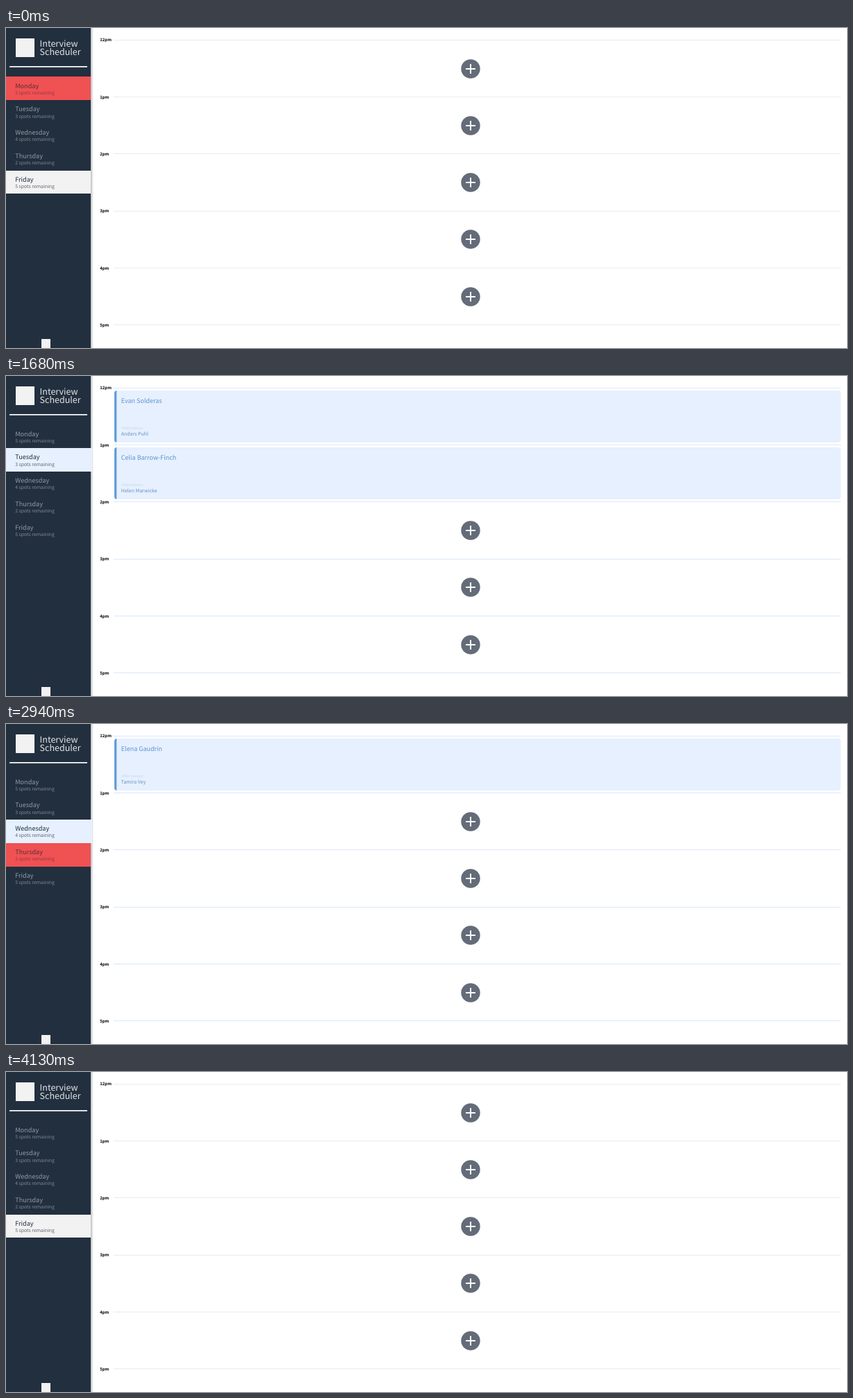
Recreate the animation shown at these times as an HTML page with a canvas. Size 1211 by 462 pixels, loop 5040 ms.

```html
<!DOCTYPE html>
<html lang="en">
<head>
<meta charset="utf-8">
<title>Interview Scheduler</title>
<style>
  html, body { margin: 0; width: 100%; height: 100%; overflow: hidden; background: #fff; }
  canvas { display: block; }
</style>
</head>
<body>
<canvas id="stage" width="1211" height="462"></canvas>
<script>
const ctx = document.getElementById('stage').getContext('2d');
const LOOP = 5040;
const FONT = '"Noto Sans CJK JP", "Noto Sans CJK SC", "Noto Sans CJK", "Noto Sans", sans-serif';
const NAVY = '#222f3e', RED = '#f05152';
const ROW_TOP = 70.2, ROW_H = 33.85, SLOT_TOP = 17.1, SLOT_H = 82.3;

// Each slot holds [student, interviewer] or null.
const DAYS = [
  { name: 'Monday', spots: 5, slots: [] },
  { name: 'Tuesday', spots: 3, slots: [['Evan Solderas', 'Anders Puhl'], ['Celia Barrow-Finch', 'Helen Marwicke']] },
  { name: 'Wednesday', spots: 4, slots: [['Elena Gaudrin', 'Tamira Vey']] },
  { name: 'Thursday', spots: 2, slots: [['qwzxtr', 'Harriet Solam'], ['Gabriel Lowe-Sandoza', 'Ivor Thul'], null, ['Bernard Tolk', 'Anders Puhl']] },
  { name: 'Friday', spots: 5, slots: [] }
];

// Start time, selected day, hovered day (-1 for none).
const STEPS = [
  [0, 4, 0], [70, 0, -1], [1120, 0, 1], [1680, 1, -1], [2170, 1, 2],
  [2590, 2, -1], [2940, 2, 3], [3360, 3, -1], [3640, 3, 4], [4130, 4, -1]
];

function rect(x, y, w, h, color) {
  ctx.fillStyle = color;
  ctx.fillRect(x, y, w, h);
}

function text(str, x, y, size, color, weight = 400) {
  ctx.font = `${weight} ${size}px ${FONT}`;
  ctx.fillStyle = color;
  ctx.fillText(str, x, y);
}

function drawSidebar(selected, hovered, pale) {
  const shade = ctx.createLinearGradient(122, 0, 126, 0);
  shade.addColorStop(0, '#b9bec5');
  shade.addColorStop(1, '#fff');
  rect(122, 0, 4, 462, shade);
  rect(0, 0, 122, 462, NAVY);

  rect(14, 15, 27, 27, '#f2f2f2');
  text('Interview', 48.6, 26.8, 12.5, '#e4e6e8', 300);
  text('Scheduler', 48.6, 39, 12.5, '#e4e6e8', 300);
  rect(5, 55, 112, 1.7, '#fff');
  rect(51, 449, 13, 13, '#f2f2f2');

  DAYS.forEach((day, i) => {
    const top = Math.round(ROW_TOP + i * ROW_H);
    const bottom = Math.round(ROW_TOP + (i + 1) * ROW_H);
    let colors = ['#929aa4', '#7f8893'];
    if (i === selected) {
      rect(0, top, pale === '#f2f2f2' ? 122 : 124, bottom - top, pale);
      colors = [NAVY, '#5f666f'];
    } else if (i === hovered) {
      rect(0, top, 122, bottom - top, RED);
      colors = ['#56303c', '#8f3e48'];
    }
    const y = ROW_TOP + i * ROW_H;
    text(day.name, 13.2, y + 16.3, 9.1, colors[0], 500);
    text(`${day.spots} spots remaining`, 13.2, y + 25.5, 6.86, colors[1]);
  });
}

function drawButton(y) {
  ctx.beginPath();
  ctx.arc(669, y, 13.7, 0, Math.PI * 2);
  ctx.fillStyle = '#636c78';
  ctx.fill();
  rect(662, y - 1, 14, 2, '#fff');
  rect(668, y - 7, 2, 14, '#fff');
}

function drawCard([student, interviewer], y) {
  ctx.save();
  ctx.beginPath();
  ctx.roundRect(156, y, 1046, 75, 4);
  ctx.clip();
  rect(156, y, 1046, 75, '#e6f0fe');
  rect(156, y, 3.3, 75, '#659cdb');
  ctx.restore();
  text(student, 165.8, y + 18, 9, '#5b93d3', 300);
  text('Interviewer', 166.5, y + 56, 5.8, '#c4d7f0', 300);
  text(interviewer, 165.8, y + 64.5, 7, '#6890c4');
}

function drawSchedule(slots, lineColor) {
  for (let i = 0; i < 6; i++) {
    const y = SLOT_TOP + i * SLOT_H;
    text(`${i || 12}pm`, 135.2, y + 2.2, 6, '#000', 700);
    rect(155, Math.floor(y), 1047, 1, lineColor);
    if (i === 5) break;
    if (slots[i]) drawCard(slots[i], Math.round(y + 4));
    else drawButton(Math.round(y + 41.4));
  }
}

function draw(now) {
  const time = now % LOOP;
  const [, selected, hovered] = STEPS.filter(step => step[0] <= time).pop();
  const { slots } = DAYS[selected];
  const booked = slots.length > 0;
  rect(0, 0, 1211, 462, '#fff');
  drawSidebar(selected, hovered, booked ? '#e6f0fe' : '#f2f2f2');
  drawSchedule(slots, booked ? '#dce8f6' : '#ebebeb');
}

ctx.textRendering = 'geometricPrecision';
const start = performance.now();
function tick() {
  draw(performance.now() - start);
  requestAnimationFrame(tick);
}
tick();
</script>
</body>
</html>
```
